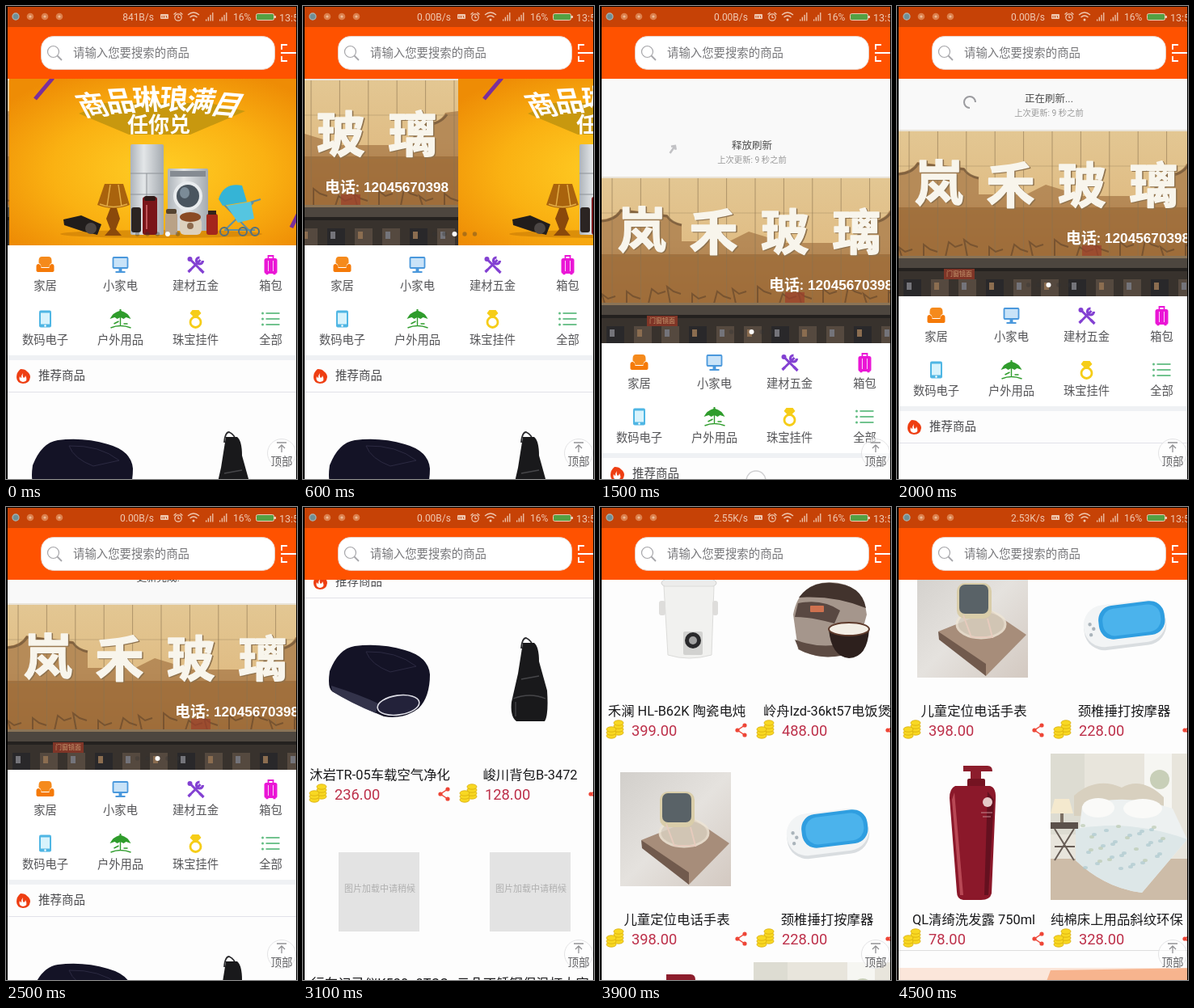
An HTML page that plays this animation: 360 by 585 pixels, repeating every 4.6 s.

```html
<!DOCTYPE html>
<html lang="zh-CN">
<head>
<meta charset="utf-8">
<style>
html, body { margin: 0; width: 100%; height: 100%; overflow: hidden; background: #000; }
svg { display: block; width: 360px; height: 585px; font-family: Roboto, "Noto Sans CJK SC", "Noto Sans CJK", sans-serif; }
</style>
</head>
<body>
<script>
const LOOP = 4600, STEP = 100, WIDTH = 372, ROW = 258;

// Shape helpers; text is placed by its vertical centre.
const text = (x, y, size, str, fill, anchor = 'start', extra = '') =>
  `<text x="${x}" y="${y + size * .36}" font-size="${size}" fill="${fill}" text-anchor="${anchor}" ${extra}>${str}</text>`;
const rect = (x, y, w, h, fill, rx = 0, extra = '') =>
  `<rect x="${x}" y="${y}" width="${w}" height="${h}" rx="${rx}" fill="${fill}" ${extra}/>`;
const oval = (x, y, rx, ry, fill, extra = '') =>
  `<ellipse cx="${x}" cy="${y}" rx="${rx}" ry="${ry}" fill="${fill}" ${extra}/>`;
const dot = (x, y, r, fill, extra = '') => oval(x, y, r, r, fill, extra);
const path = (d, fill, extra = '') => `<path d="${d}" fill="${fill}" ${extra}/>`;
const line = (d, color, w = 1, extra = '') =>
  path(d, 'none', `stroke="${color}" stroke-width="${w}" ${extra}`);
const group = (x, y, body, extra = '') => `<g transform="translate(${x} ${y}) ${extra}">${body}</g>`;
const repeat = (n, fn) => Array.from({ length: n }, (_, i) => fn(i)).join('');

function statusBar() {
  const c = '#f0c9b2';
  const bars = x => repeat(4, i => rect(x + i * 2.7, 16.5 - i * 2.8, 1.3, 2 + i * 2.8, c));
  return rect(2, 1, 357, 25, '#c64206') +
    dot(12, 13, 4, '#6f8f95', 'stroke="#a5b0ae" stroke-width="1.3"') +
    [30, 48, 66].map(x => dot(x, 13, 4.3, '#dc804d') + dot(x, 13, 1.6, '#efbb96')).join('') +
    text(183, 14, 12, '', c, 'end', 'id="speed"') +
    rect(191, 10, 10, 6, c, 1) + line('M193 12v2.5M195.5 12v2.5M198 12l1 2.5', '#c64206') +
    dot(213, 14, 4.2, 'none', `stroke="${c}" stroke-width="1.2"`) +
    line('M213 11.5v3h2M207.5 10.5l3-2.5M218.5 10.5l-3-2.5', c, 1.2) +
    line('M225 11q7-6 14 0M227.5 14q4.5-4 9 0', c, 1.3) + dot(232, 17, 1.5, c) +
    bars(247) + bars(264) + text(281, 14, 12, '16%', c) +
    rect(309.5, 9.5, 22, 8, '#54a044', 2, `stroke="${c}"`) + rect(332, 12, 2, 3, c) +
    text(338, 14, 12.5, '13:57', c);
}

function searchBar() {
  return rect(2, 26, 357, 64, '#ff5200') +
    rect(43.5, 37.5, 289, 41, '#fff', 15, 'stroke="#e9cfc3"') +
    dot(58.5, 56.5, 7, 'none', 'stroke="#a6a6aa" stroke-width="1.2"') +
    line('M63.5 61.5l5.5 5.5', '#a6a6aa', 1.8) +
    text(83, 58, 14.4, '请输入您要搜索的商品', '#77777a') +
    line('M341 54v-6h7M341 62v6h7M340 58h24', '#fff', 1.8);
}

function applianceBanner() {
  const title = [...'商品琳琅满目'].map((ch, i) => {
    const k = i - 2.5;
    return group(189 + k * 33.5, 115 + k * k * 1.2, text(0, 0, 35, ch, '#fff', 'middle', 'font-weight="700"'),
      `rotate(${k * 2}) skewX(${-k * 9})`);
  }).join('');
  return rect(2, 90, WIDTH, 206, 'url(#amber)') +
    line('M34 115L56 89M351 274L368 240', '#7a2f9c', 5) +
    path('M88 133L150 159H226L294 130L250 120H120Z', '#c8980f') + title +
    text(187, 147, 26, '任你兑', '#fff', 'middle', 'font-weight="700"') +
    oval(190, 282, 125, 5, '#c97c06', 'opacity=".6"') +
    // fridge and washer
    rect(152, 171, 41, 112, 'url(#steel)', 2) + line('M152 207h41M152 233h41M172 207v76', '#8e9398') +
    rect(198, 201, 50, 77, 'url(#steel)', 2) + rect(201, 204, 44, 7, '#858b92') +
    dot(223, 235, 18, '#e9ecee') + dot(223, 235, 14, '#4a555f') + oval(219, 231, 6, 7, '#7b8b97') +
    // lamp
    path('M120 220H143L151 246Q131 254 111 246Z', '#a9630d') + line('M114 245q17 7 34 0M127 221l-4 27M137 221l4 27', '#e2ac45', 1.5) +
    path('M127 250h8l4 13-5 13 7 8H120l7-8-5-13Z', '#8a490b') +
    // camcorder
    path('M69 264L91 259L116 270L111 283L94 279L70 271Z', '#211d1c') + dot(103, 275, 7, '#4b4644') +
    rect(153, 249, 12, 31, '#2b2422', 3) +
    rect(167, 236, 18, 47, '#7a1519', 3) + rect(169, 235, 14, 6, '#2e1917', 2) + rect(171, 246, 2, 30, '#bf565a') +
    rect(195, 256, 15, 27, '#b9a287', 3) + rect(196, 251, 13, 6, '#54432f', 2) +
    rect(213, 262, 27, 21, '#ddd0bd', 6) + oval(226, 261, 13, 6, '#8a4a25') + dot(226, 272, 4, '#8d6a4e') +
    rect(246, 257, 14, 26, '#a3261c', 3) + rect(248, 253, 10, 5, '#33221b') +
    // stroller
    line('M268 246L302 281M304 243L270 276M300 243L313 239M268 277H306', '#5f8fa3', 2) +
    path('M261 239Q267 218 290 222L296 242L266 247Z', '#35b4d6') + path('M271 247L301 242L305 263L285 268Z', '#55c5e0') +
    [268, 291, 306].map(x => dot(x, 279, 5, 'none', 'stroke="#55707b" stroke-width="2"')).join('');
}

function shopBanner() {
  const brush = 'font-weight="900" stroke-width="1.6" stroke-linejoin="round"';
  const sign = [...'岚禾玻璃'].map((ch, i) => {
    const x = 52 + i * 88.5, y = i ? 159 : 156;
    return text(x + 1.5, y + 1.5, 60, ch, '#8f734f', 'middle', brush + ' stroke="#8f734f"') +
      text(x, y, 60, ch, '#f8f5ec', 'middle', brush + ' stroke="#f8f5ec"');
  }).join('');
  return rect(2, 90, WIDTH, 206, 'url(#wall)') + rect(2, 90, WIDTH, 2, '#e9e3d8') +
    // buildings mirrored in the glass
    path('M2 143Q18 142 25 130L83 137Q86 146 101 149V170H160L184 158L230 172H314L328 146Q352 145 358 132L374 130V248H2Z', '#a97a48', 'opacity=".75"') +
    line('M2 145Q19 144 26 132L83 139Q88 147 101 150M314 172L328 148Q352 147 360 134', '#6d5236', 3, 'opacity=".7"') +
    path('M2 186H374V248H2Z', '#96632f', 'opacity=".6"') +
    line(repeat(11, i => `M${15 + i * 35.4} 92V246`), '#8b7350', 1, 'opacity=".6"') +
    line('M2 135H374M2 188H374', '#8b7350', 1, 'opacity=".35"') +
    line(repeat(14, i => `M${6 + i * 27} 247l${i % 3 * 4 - 4}-${12 + i % 4 * 3}l8 6l9 ${i % 2 * 6 - 3}`), '#5f432a', 2, 'opacity=".6"') +
    rect(229, 233, 24, 13, '#9c3f2c', 0, 'opacity=".7"') +
    rect(2, 246, WIDTH, 50, '#38322d') + rect(2, 246, WIDTH, 3, '#8a7457') + rect(2, 249, WIDTH, 12, '#4d463f') + rect(2, 261, WIDTH, 4, '#24211f') +
    repeat(11, i => rect(8 + i * 34, 275, 22, 21, i % 3 ? '#55493f' : '#29282a') + rect(12 + i * 34, 279, 6, 9, i % 2 ? '#8b6d50' : '#74747a')) +
    rect(58, 262, 38, 13, '#7f3527') + text(77, 268.5, 8, '门窗镜面', '#c99c72', 'middle') +
    sign + text(209, 224, 19, '电话', '#fff', 'start', 'font-weight="700"') +
    text(247, 224, 17, ':', '#fff', 'start', 'font-weight="700"') +
    text(257, 224, 17.2, '12045670398', '#fff', 'start', 'font-weight="700" style="font-family:Liberation Sans,sans-serif"');
}

function categories() {
  const icons = [
    path('M-4-10H4Q8-10 8-5V-2Q5-1 5 3H-5Q-5-1-8-2V-5Q-8-10-4-10Z', '#f58a1c') +
      path('M-8-1Q-5 0-5 4H5Q5 0 8-1Q11-1 11 2V7Q11 9 8 9H-8Q-11 9-11 7V2Q-11-1-8-1Z', '#f57a08'),
    rect(-9, -9, 18, 13, '#c9e3f8', 1, 'stroke="#4a98dc" stroke-width="1.8"') + path('M-2 5H2V8H6V10H-6V8H-2Z', '#4a98dc'),
    line('M-7 7L6-6M-6-6L8 8', '#8341d2', 3) + dot(-7, -7, 3, '#8341d2') +
      line('M5-9a4 4 0 1 0 4 4M-9 9l3-3M5 5l5 5', '#8341d2', 3.2),
    rect(-8, -8, 16, 19, '#ea16d6', 2.5) + line('M-3-8v-3H3v3', '#ea16d6', 1.8) + line('M-3-5V8M3-5V8', '#fff', .8) + line('M-6 11.5h3M3 11.5h3', '#ea16d6', 1.5),
    rect(-7.5, -10.5, 15, 21, '#4fb6e4', 2) + rect(-5.5, -7.5, 11, 14, '#d8f3fc') + dot(0, 8.5, 1.2, '#fff'),
    path('M-13 0Q-9-8-1-10V-12H1V-10Q9-8 13 0L7-2L4 0L0-2L-4 0L-7-2Z', '#2f9c2c') +
      line('M0-2V8M-12 11Q0 6 13 11M-8 6l6-3M4 6h5', '#2f9c2c', 1.4),
    dot(0, 4, 6.5, 'none', 'stroke="#f6cd18" stroke-width="2.8"') + path('M-4-11H4L7-7L2-2H-2L-7-7Z', '#f6cd18'),
    [-7, 0, 7].map(y => dot(-10, y, 1.5, '#62bd83') + line(`M-6 ${y}H11`, '#62bd83', 1.8)).join('')
  ];
  const names = ['家居', '小家电', '建材五金', '箱包', '数码电子', '户外用品', '珠宝挂件', '全部'];
  return rect(2, 296, WIDTH, 136, '#fff') + names.map((name, i) => {
    const x = 48.5 + i % 4 * 93, y = i < 4 ? 320 : 387;
    return group(x, y, icons[i]) + text(x, y + 25.5, 14.3, name, '#555558', 'middle');
  }).join('');
}

function sectionTitle() {
  return rect(2, 432, WIDTH, 6, '#eff1f4') +
    path('M18 449Q24 449 26 452Q30 455 30 459Q29 467 21 467Q13 466 13 459Q13 453 18 449Z', '#ee3e12') +
    path('M21 454Q20 458 22 460Q24 459 24 457Q28 464 21 465Q15 464 17 458Q18 460 19 460Q19 456 21 454Z', '#fff') +
    text(40, 457, 14.5, '推荐商品', '#48484b') + rect(2, 477, WIDTH, 1, '#e2e2e9');
}

// Product pictures; y is relative to the centre of the name below.
const blank = x => rect(x, -162, 100, 98, '#e3e3e3') +
  text(x + 51, -117, 11, '图片加载中请稍候', '#a3a3a3', 'middle', 'opacity=".8"');
const pictures = [
  path('M64-159Q96-163 126-154Q155-146 157-124Q157-96 143-82Q125-68 100-72Q66-86 36-103Q30-107 33-128Q44-156 64-159Z', '#141326') +
    path('M35-110Q70-99 93-88L90-76Q60-88 36-103Z', '#33334a') + line('M78-152Q116-153 140-134L108-127Q84-136 78-152Z', '#2c2a42') +
    oval(118, -86, 26, 12, '#23223a', 'stroke="#dedee6" stroke-width="1.6" transform="rotate(-8 118 -86)"'),
  line('M270-156q1-13 6-13q7 3 9 12', '#2b2b2e', 1.8) +
    path('M272-163H286Q292-158 292-140L302-104Q304-74 299-66H264Q256-72 258-90L266-125Z', '#19191b') +
    line('M270-118L292-122M260-94Q281-102 300-94M263-72V-90', '#464649', 1.3),
  blank(44), blank(231),
  oval(110, -158, 34, 9, '#ececeb', 'stroke="#cfcfce"') + oval(110, -170, 8, 4, '#d6d6d5') +
    path('M79-154H141L138-69Q110-61 84-69Z', '#f1f1ef', 'stroke="#dcdcda"') +
    rect(73, -136, 8, 18, '#dedddb', 3) + rect(139, -136, 7, 18, '#dedddb', 3) +
    rect(103, -98, 24, 29, '#d2d2d0', 2) + dot(115, -87, 10, '#29292b') + dot(115, -87, 5, '#a2a2a2'),
  path('M239-119Q246-158 284-159Q326-158 330-119L318-75Q280-58 245-76Z', '#a5968c') +
    path('M246-140Q260-160 288-158Q324-156 329-127Q290-143 246-140Z', '#42332d') +
    path('M245-133Q275-139 297-124L290-108Q262-116 241-116Z', '#594842') + rect(260, -130, 17, 8, '#cf714f', 1) +
    path('M241-88Q279-73 318-88L316-74Q279-58 246-76Z', '#5d4b43') +
    path('M283-101H333Q331-66 308-65Q286-67 283-101Z', '#2d201d') + oval(308, -101, 25, 8, '#f3eee5', 'stroke="#5f3b2c" stroke-width="2"'),
  rect(25, -182, 137, 141, 'url(#photo)') + path('M51-98L116-124L160-94L110-43Z', '#a78d7a') +
    path('M51-98L110-58V-43L52-88Z', '#715a4d') + oval(104, -107, 30, 17, '#d9cfbf', 'stroke="#eee5d5" stroke-width="3" opacity=".85"') +
    rect(74, -158, 43, 44, '#d9cda9', 10) + rect(77, -156, 36, 36, '#596267', 7) + line('M82-118L92-91H118L112-114', '#e6cbbd', 2),
  `<g transform="rotate(-7 282 -106)">` + rect(231, -132, 102, 54, '#d9dde0', 25) + rect(231, -134, 102, 52, '#f2f4f5', 25) +
    rect(250, -132, 82, 42, '#2f9ee0', 18) + rect(255, -128, 72, 34, '#4bb3ec', 15) +
    [[239, -112], [243, -106], [239, -99]].map(p => dot(...p, 2.2, '#aab4bb')).join('') + '</g>',
  path('M82-190H112Q118-190 118-183H104V-168H91V-183H82Z', '#8c1d2c') + rect(87, -174, 22, 16, '#741321', 2) +
    path('M72-165H115Q123-163 122-148L117-32Q115-24 104-24H82Q74-25 74-34L65-150Q65-162 72-165Z', '#8b182a') +
    path('M71-157L82-30H78L68-148Z', '#b84855') + path('M112-158L108-30H113L120-148Z', '#64101f') +
    dot(112, -145, 6, '#e5c9c8') + line('M104-132h14M106-127h10', '#c58c92'),
  rect(190, -205, 184, 181, '#e8e5dc') + rect(190, -205, 42, 100, '#dddcd2') + rect(306, -205, 34, 80, '#f6f6f2') +
    path('M219-128V-153Q246-177 278-163Q303-177 330-151V-126Z', '#d8d0bf') +
    path('M190-75H374V-24H190Z', '#cdbca8') + path('M229-140Q280-158 341-137L359-99L303-33Q257-39 221-73Z', '#edf1f1') +
    path('M221-112Q288-124 359-99L303-33Q257-39 221-73Z', '#dde7e8') + oval(249, -138, 20, 12, '#fafaf8') + oval(304, -137, 24, 12, '#fafaf8') +
    repeat(36, i => oval(230 + i * 37 % 100, -116 + i * 23 % 55, 3, 2, i % 3 ? '#a9c6cc' : '#b8c8ad', 'opacity=".65"')) +
    path('M190-120H224V-112H190Z', '#5b514b') + line('M195-112L219-73M219-112L195-73M195-90h25', '#675d56', 2) +
    path('M195-149h18l5 18h-28Z', '#f4e9ce') + rect(202, -131, 4, 11, '#7c7064') + dot(325, -173, 12, '#c8cfb8')
];
const goods = [
  ['沐岩TR-05车载空气净化', '236.00'], ['峻川背包B-3472', '128.00'],
  ['行车记录仪K520+8TCC', '318.00'], ['云朵不锈钢保温杯大容', '89.00'],
  ['禾澜 HL-B62K 陶瓷电炖', '399.00'], ['岭舟lzd-36kt57电饭煲', '488.00'],
  ['儿童定位电话手表', '398.00'], ['颈椎捶打按摩器', '228.00'],
  ['QL清绮洗发露 750ml', '78.00'], ['纯棉床上用品斜纹环保', '328.00']
];

function product([name, price], i) {
  const x = i % 2 * 186, coin = (cx, cy) => oval(cx, cy, 6, 3.2, '#f8d822', 'stroke="#d9ac0c" stroke-width=".8"');
  const stack = (cx, cy, n) => repeat(n, k => coin(cx, cy - k * 4));
  // Names too wide for the column start at its left edge.
  const label = name === '纯棉床上用品斜纹环保' || name === '云朵不锈钢保温杯大容'
    ? text(190, 0, 16.4, name, '#19191b') : text(x + 95, 0, 16.4, name, '#19191b', 'middle');
  return group(0, 696 + (i >> 1) * ROW, pictures[i] + label +
    stack(x + 23, 27, 4) + stack(x + 14, 31, 3) +
    text(x + 39, 24, 18.3, price, '#bd304a') +
    line(`M${x + 179} 18L${x + 170} 24L${x + 179} 30`, '#ee4637', 1.5) +
    [[179, 18], [170, 24], [179, 30]].map(([px, py]) => dot(x + px, py, 2.6, '#ee4637')).join(''));
}

const footer = rect(2, 1766, WIDTH, 1, '#dedede') + rect(2, 1788, WIDTH, 110, '#fbe6da') +
  path('M190 1791L374 1788V1898H150Z', '#f7b48e');

const refreshHeader = rect(2, -110, WIDTH, 200, '#f9f9f9') +
  text(188, 51, 12.5, '', '#4c4c4c', 'middle', 'id="state"') +
  text(188, 69, 10.3, '上次更新: 9 秒之前', '#999', 'middle', 'id="updated"') +
  `<g id="arrow">${line('M0-5V6M-3.5-1.5L0-5L3.5-1.5', '#c2c2c5', 2.6)}</g>` +
  `<g id="spinner">${line('M7 0A7 7 0 1 1 0-7', '#9b9b9f', 2)}</g>`;

const topButton = dot(341, 553, 17.5, '#fff', 'fill-opacity=".6" stroke="#e3e3e5"') +
  line('M335 540h12M341 552V543M337 547l4-4 4 4', '#929295', 1.3) + text(341, 563.5, 13.5, '顶部', '#606063', 'middle');

const stops = (...list) => list.map(([at, color]) => `<stop offset="${at}" stop-color="${color}"/>`).join('');

document.body.innerHTML = `<svg viewBox="0 0 360 585"><defs>
  <clipPath id="screen">${rect(2, 90, 357, 495, '#fff')}</clipPath><clipPath id="edge">${rect(2, 1, 357, 584, '#fff')}</clipPath>
  <radialGradient id="amber" cy=".55" r=".65">${stops([0, '#ffce25'], [.55, '#fab112'], [1, '#ee8c05'])}</radialGradient>
  <linearGradient id="steel">${stops([0, '#aeb4ba'], [.4, '#e3e6e8'], [1, '#a4aab0'])}</linearGradient>
  <linearGradient id="wall" x2="0" y2="1">${stops([0, '#e3c793'], [.4, '#e0bd85'], [.75, '#b98a55'])}</linearGradient>
  <linearGradient id="photo" x2="1" y2="1">${stops([0, '#d2cfcb'], [.5, '#e5e2de'], [1, '#d3c9c1'])}</linearGradient>
</defs><g clip-path="url(#screen)">${rect(2, 90, 357, 495, '#fdfdfd')}
  <g id="page">${refreshHeader}<g id="slides">${applianceBanner()}${group(-WIDTH, 0, shopBanner())}</g>
    ${repeat(5, i => dot(162.5 + i * 12.5, 282, 2.7, '#333', 'opacity=".35"'))}${dot(0, 282, 3, '#fff', 'id="active"')}
    ${categories()}${sectionTitle()}${goods.map(product).join('')}${footer}</g>
  ${topButton}${dot(193, 0, 12, '#fff', 'id="touch" fill-opacity=".5" stroke="#cfcfd1" stroke-width="1.5"')}
</g><g clip-path="url(#edge)">${statusBar()}${searchBar()}</g></svg>`;

const $ = id => document.getElementById(id);
const move = (id, x, y, turn = 0) => $(id).setAttribute('transform', `translate(${x} ${y}) rotate(${turn})`);
const show = (id, on) => $(id).setAttribute('visibility', on ? 'visible' : 'hidden');

// Linear value through [time, value] points.
function track(t, keys) {
  const i = keys.findIndex(k => k[0] > t);
  if (i < 0) return keys[keys.length - 1][1];
  if (!i) return keys[0][1];
  const [a, v] = keys[i - 1], [b, w] = keys[i];
  return v + (w - v) * (t - a) / (b - a);
}

const slide = [[0, 2], [200, 14], [400, 75], [600, 190], [800, 302], [1000, 360], [1100, 368], [1200, WIDTH]];
const pull = [[1200, 0], [1300, 35], [1500, 121], [1600, 135], [1700, 63], [2400, 63], [2500, 29], [2600, 0]];
const scroll = [[2700, 0], [2800, 55], [3100, 365], [3500, 705], [3900, 960], [4200, 1110], [4500, 1218]];

function draw(now) {
  const t = Math.floor(now % LOOP / STEP) * STEP;
  const dy = track(t, pull), off = track(t, slide);
  const done = t >= 2400, loading = t >= 1700 && !done;
  move('page', 0, dy - track(t, scroll));
  move('slides', off, 0);
  $('active').setAttribute('cx', off > WIDTH / 2 ? 187.5 : 200);
  $('speed').textContent = t < 500 ? '841B/s' : t < 3500 ? '0.00B/s' : t < 4200 ? '2.55K/s' : '2.53K/s';
  $('state').textContent = done ? '更新完成!' : loading ? '正在刷新...' : t < 1500 ? '下拉刷新' : '释放刷新';
  move('state', 0, done ? 7 : 0);
  move('arrow', 90, 56, track(t, [[1400, 180], [1500, 35], [1600, 0]]));
  move('spinner', 90, 56, Math.max(0, t - 1800) * .45);
  show('updated', !done);
  show('arrow', t < 1700);
  show('spinner', loading);
  show('touch', t > 1200 && t < 1700);
  $('touch').setAttribute('cy', 345 + dy * 2);
  requestAnimationFrame(() => draw(performance.now() - start));
}
const start = performance.now();
draw(0);
</script>
</body>
</html>
```
